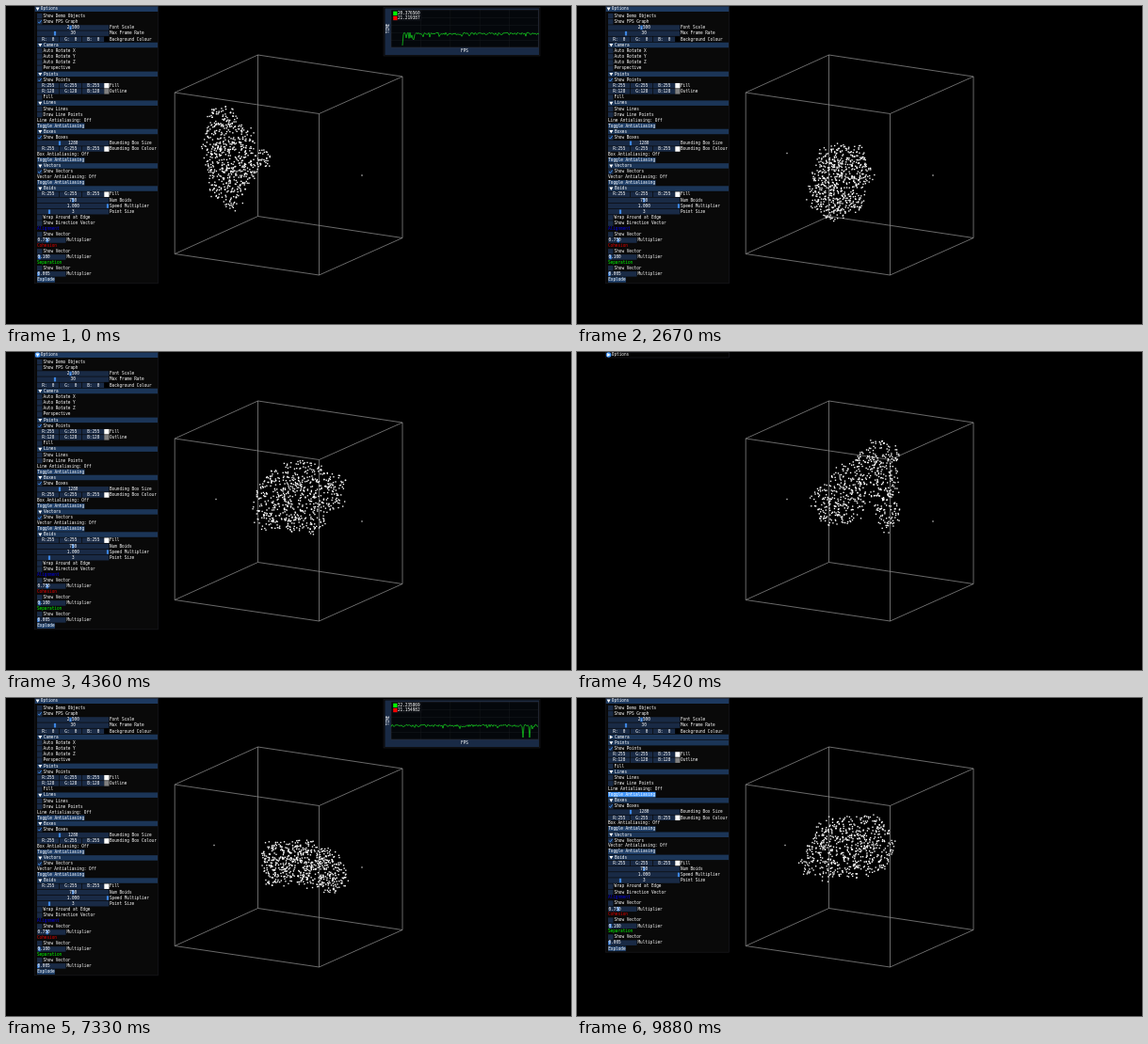
An HTML page with a canvas that plays this animation: 600 px wide and 338 px high, repeating every 9910 ms.

```html
<!DOCTYPE html>
<html>
<head>
<meta charset="utf-8">
<style>
html, body { margin: 0; height: 100%; background: #000; overflow: hidden; }
canvas { display: block; }
</style>
</head>
<body>
<canvas id="stage" width="600" height="338"></canvas>
<script>
const ctx = document.getElementById('stage').getContext('2d');
const LOOP = 9.91;
const WHITE = '#fff', PANEL = '#090909', FRAME = '#192a45', GRAB = '#3d85e0', MARK = '#4296fa';
const BUTTON = '#20406a', HEADER = '#1b3557', BORDER = '#1c1c22';

const between = (t, a, b) => t >= a && t < b;
const hash = n => { const s = Math.sin(n * 127.1 + 311.7) * 43758.5453; return s - Math.floor(s); };

function rect(x, y, w, h, color) {
  ctx.fillStyle = color;
  ctx.fillRect(x, y, w, h);
}

function outline(x, y, w, h, color) {
  ctx.strokeStyle = color;
  ctx.lineWidth = 0.6;
  ctx.strokeRect(x, y, w, h);
}

// Large font scaled down keeps the advance widths exact at tiny sizes.
function text(str, x, y, color = WHITE, align = 'left', angle = 0) {
  ctx.save();
  ctx.translate(x, y);
  ctx.rotate(angle);
  ctx.scale(0.0436, 0.0436);
  ctx.font = '100px "DejaVu Sans Mono", monospace';
  ctx.textAlign = align;
  ctx.textBaseline = 'middle';
  ctx.fillStyle = color;
  ctx.fillText(str, 0, 0);
  ctx.restore();
}

function path(points, color, width) {
  ctx.beginPath();
  points.forEach(([x, y]) => ctx.lineTo(x, y));
  ctx.strokeStyle = color;
  ctx.lineWidth = width;
  ctx.stroke();
}

function arrow(x, y, open) {
  ctx.save();
  ctx.translate(x, y);
  if (!open) ctx.rotate(-Math.PI / 2);
  ctx.beginPath();
  ctx.moveTo(-2, -1.5);
  ctx.lineTo(2, -1.5);
  ctx.lineTo(0, 1.9);
  ctx.fillStyle = WHITE;
  ctx.fill();
  ctx.restore();
}

// ---- Options panel ----
const widgets = {
  check(y, label, on) {
    rect(33, y, 5.5, 5.5, FRAME);
    if (on) path([[34.2, y + 2.8], [35.4, y + 4.2], [37.6, y + 1.2]], MARK, 0.9);
    text(label, 39.6, y + 2.9);
  },
  slider(y, label, value, grabX) {
    rect(33, y, 76.3, 5.5, FRAME);
    rect(grabX - 1.1, y + 0.5, 2.2, 4.5, GRAB);
    text(value, 71.2, y + 2.9, WHITE, 'center');
    text(label, 110, y + 2.9);
  },
  color(y, label, value, swatch) {
    ['R:', 'G:', 'B:'].forEach((channel, i) => {
      rect(33 + i * 24, y, 23.3, 5.5, FRAME);
      text(channel + value, 44.7 + i * 24, y + 2.9, WHITE, 'center');
    });
    rect(104.3, y, 5.2, 5.5, swatch);
    text(label, 110, y + 2.9);
  },
  weight(y, value) {
    rect(33, y, 30.5, 5.5, FRAME);
    rect(33.2 + value * 12.6, y + 0.5, 2.2, 4.5, GRAB);
    text(value.toFixed(3), 33.6, y + 2.9);
    text('Multiplier', 64.4, y + 2.9);
  },
  header(y, label, open = true) {
    rect(33, y, 128, 5.5, HEADER);
    arrow(36.3, y + 2.8, open);
    text(label, 40, y + 2.9);
  },
  button(y, label, hover) {
    rect(33, y, label.length * 2.63 + 0.5, 5.5, hover ? MARK : BUTTON);
    text(label, 33.2, y + 2.9);
  },
  text(y, label, color) { text(label, 33, y + 2.5, color); }
};

const antialiasing = (name, hover) => [
  ['text', name + ' Antialiasing: Off'],
  ['button', 'Toggle Antialiasing', hover]
];

const rule = (name, color, value) => [
  ['text', name, color], ['check', 'Show Vector'], ['weight', value]
];

function panelRows(state) {
  const camera = ['Auto Rotate X', 'Auto Rotate Y', 'Auto Rotate Z', 'Perspective'].map(s => ['check', s]);
  return [
    ['check', 'Show Demo Objects'],
    ['check', 'Show FPS Graph', state.graph],
    ['slider', 'Font Scale', '2.500', 68.5],
    ['slider', 'Max Frame Rate', '30', 52],
    ['color', 'Background Colour', '  0', '#000'],
    ['header', 'Camera', state.camera],
    ...(state.camera ? camera : []),
    ['header', 'Points'],
    ['check', 'Show Points', true],
    ['color', 'Fill', '255', WHITE],
    ['color', 'Outline', '128', '#808080'],
    ['check', 'Fill'],
    ['header', 'Lines'],
    ['check', 'Show Lines'],
    ['check', 'Draw Line Points'],
    ...antialiasing('Line', state.toggleHover),
    ['header', 'Boxes'],
    ['check', 'Show Boxes', true],
    ['slider', 'Bounding Box Size', '1280', 57],
    ['color', 'Bounding Box Colour', '255', WHITE],
    ...antialiasing('Box'),
    ['header', 'Vectors'],
    ['check', 'Show Vectors', true],
    ...antialiasing('Vector'),
    ['header', 'Boids'],
    ['color', 'Fill', '255', WHITE],
    ['slider', 'Num Boids', '750', 71.2],
    ['slider', 'Speed Multiplier', '1.000', 108],
    ['slider', 'Point Size', '3', 46],
    ['check', 'Wrap Around at Edge'],
    ['check', 'Show Direction Vector'],
    ...rule('Alignment', '#00d', 0.75),
    ...rule('Cohesion', '#d00', 0.1),
    ...rule('Separation', '#0f0', 0.005),
    ['button', 'Explode']
  ];
}

function drawPanel(state) {
  const rows = panelRows(state);
  const pitch = row => row[0] === 'text' ? 5.6 : 6.17;
  const height = state.open ? rows.reduce((sum, row) => sum + pitch(row), 8.3) : 6;
  rect(30.5, 0, 131, height, PANEL);
  rect(30.5, 0, 131, 6, state.open ? '#1d395f' : '#030303');
  outline(30.5, 0.3, 131, height - 0.3, BORDER);
  if (state.arrowHover) {
    ctx.beginPath();
    ctx.arc(33.6, 3, 2.8, 0, 7);
    ctx.fillStyle = MARK;
    ctx.fill();
  }
  arrow(33.6, 3, state.open);
  text('Options', 36.8, 3.2);
  if (!state.open) return;
  let y = 7.9;
  for (const row of rows) {
    const [kind, ...args] = row;
    widgets[kind](y, ...args);
    y += pitch(row);
  }
}

// ---- FPS graph ----
const readings = ['20.376560', '21.804213', '20.951874', '21.460338', '22.775412', '22.235869', '21.092745', '20.684107', '21.933016'];
const averages = ['21.219387', '21.224105', '21.228956', '21.233480', '21.237669', '21.154982', '21.171346', '21.189720', '21.203518'];

function fpsLevel(n) {
  if (n < -132) return 28 + hash(n) * 12 * hash(n + 9);
  if (n === 71 || n === 78) return 42;
  return 28.2 + hash(n) * 2.4 + (hash(n + 50) > 0.95 ? 2.5 : 0);
}

function drawGraph(t) {
  rect(401, 1.5, 166, 51.5, PANEL);
  rect(402.5, 2.5, 163.5, 49.5, FRAME);
  outline(401, 1.5, 166, 51.5, BORDER);
  rect(409, 4, 156.5, 40, '#04070b');
  for (let i = 1; i < 5; i++) {
    rect(409 + i * 31.3, 4, 0.5, 40, '#15181c');
    rect(409, 4 + i * 8, 156.5, 0.5, '#15181c');
  }
  outline(409, 4, 156.5, 40, '#2c2c34');
  const last = Math.floor(t * 12), shift = t * 12 - last, line = [];
  for (let i = 0; i < 157; i++) {
    const n = last - i;
    if (n >= -145) line.push([Math.min(565.5, 566 - i - shift), n === -145 ? 42 : fpsLevel(n)]);
  }
  path(line, '#12c41c', 0.8);
  const i = Math.floor(t / 0.31) % readings.length;
  rect(410.5, 5, 31, 11, '#0c0f14');
  rect(411.2, 5.7, 4.3, 4.3, '#0f0');
  rect(411.2, 10.8, 4.3, 4.3, '#f00');
  text(readings[i], 416, 8);
  text(averages[i], 416, 13.2);
  text('FPS', 487, 48.2, WHITE, 'center');
  text('TIME', 405.5, 24, WHITE, 'center', -Math.PI / 2);
}

// ---- Bounding box ----
function drawBox() {
  const top = [[179.2, 92], [332.5, 114.5], [421, 75], [267.5, 52]];
  const bottom = top.map(([x, y]) => [x, y + 171.5]);
  const color = '#8c8c8c';
  path([...top, top[0]], color, 0.75);
  path([...bottom, bottom[0]], color, 0.75);
  top.forEach((p, i) => path([p, bottom[i]], color, 0.75));
}

// ---- Flock: a centre and eight outline corners, clockwise from the left, at each time ----
const times = [0, 1.24, 2.67, 4.36, 5.42, 7.33, 9.88];
const shapes = [
  [237, 157, 209, 151, 219, 108, 235, 106, 250, 124, 283, 162, 263, 180, 241, 220, 218, 198],
  [313, 168, 276, 176, 284, 129, 298, 124, 320, 138, 344, 160, 352, 190, 345, 205, 304, 202],
  [281, 186, 249, 184, 258, 154, 278, 147, 302, 151, 314, 178, 302, 214, 268, 229, 244, 207],
  [312, 155, 262, 162, 274, 129, 315, 115, 335, 123, 360, 134, 356, 165, 331, 191, 269, 188],
  [318, 140, 247, 152, 318, 91, 341, 104, 341, 187, 321, 190, 313, 152, 297, 183, 259, 182],
  [316, 178, 271, 165, 279, 153, 318, 151, 350, 163, 363, 190, 350, 208, 320, 198, 278, 199],
  [288, 158, 239, 172, 258, 131, 300, 124, 329, 130, 337, 160, 324, 186, 280, 191, 241, 192]
];

const boids = Array.from({ length: 640 }, (_, i) => ({
  turn: hash(i), reach: hash(i + 1000) ** 0.53, wander: hash(i + 2000) * 5, phase: hash(i + 3000) * 6.28
}));

function slope(k, c) {
  const a = Math.max(0, k - 1), b = Math.min(times.length - 1, k + 1);
  return (shapes[b][c] - shapes[a][c]) / (times[b] - times[a]);
}

function flockShape(t) {
  let k = 0;
  while (k < times.length - 2 && t >= times[k + 1]) k++;
  const span = times[k + 1] - times[k];
  const s = Math.min(1, (t - times[k]) / span), s2 = s * s, s3 = s2 * s;
  return shapes[k].map((from, c) =>
    from * (2 * s3 - 3 * s2 + 1) + shapes[k + 1][c] * (3 * s2 - 2 * s3) +
    span * (slope(k, c) * (s3 - 2 * s2 + s) + slope(k + 1, c) * (s3 - s2)));
}

const dot = (x, y) => rect(x - 0.68, y - 0.68, 1.36, 1.36, WHITE);

function drawFlock(t) {
  const [cx, cy, ...flat] = flockShape(t);
  const corners = Array.from({ length: 9 }, (_, i) => [flat[i % 8 * 2] - cx, flat[i % 8 * 2 + 1] - cy]);
  const areas = corners.slice(0, 8).map(([x, y], i) =>
    Math.abs(x * corners[i + 1][1] - y * corners[i + 1][0]));
  const total = areas.reduce((a, b) => a + b);
  for (const { turn, reach, wander, phase } of boids) {
    let rest = (turn + t * 0.05) % 1 * total, i = 0;
    while (i < 7 && rest > areas[i]) rest -= areas[i++];
    const f = rest / areas[i], [ax, ay] = corners[i], [bx, by] = corners[i + 1];
    const angle = phase + t * 1.5;
    dot(cx + reach * (ax + (bx - ax) * f) + wander * Math.cos(angle),
        cy + reach * (ay + (by - ay) * f) + wander * Math.sin(angle));
  }
}

function drawStrays(t) {
  const gray = '#b8b8b8';
  if (t < 9) rect(377.3, 179.3, 1.4, 1.4, gray);
  if (between(t, 0.6, 2)) [[227, 147], [236, 161], [245, 164]].forEach(([x, y]) => {
    const drift = (t - 1.24) * 22;
    dot(x + drift, y + drift * 0.2);
  });
  if (t > 0.6) rect((t < 2 || t > 6 ? 221 : 223) - 0.7, (t < 2 ? 161 : 156.5) - 0.7, 1.4, 1.4, gray);
}

function draw(now) {
  const t = now / 1000 % LOOP;
  const state = {
    open: !between(t, 0.8, 1.15) && !between(t, 4.55, 5.7),
    graph: t < 2.35 || between(t, 3.15, 3.6) || between(t, 6.5, 9.6),
    camera: t < 8.75,
    arrowHover: between(t, 0.65, 1.4) || between(t, 4.2, 5.85),
    toggleHover: t > 9.8
  };
  rect(0, 0, 600, 338, '#000');
  drawBox();
  drawStrays(t);
  drawFlock(t);
  drawPanel(state);
  if (state.graph) drawGraph(t);
}

const start = performance.now();
function tick() {
  draw(performance.now() - start);
  requestAnimationFrame(tick);
}
tick();
</script>
</body>
</html>
```
